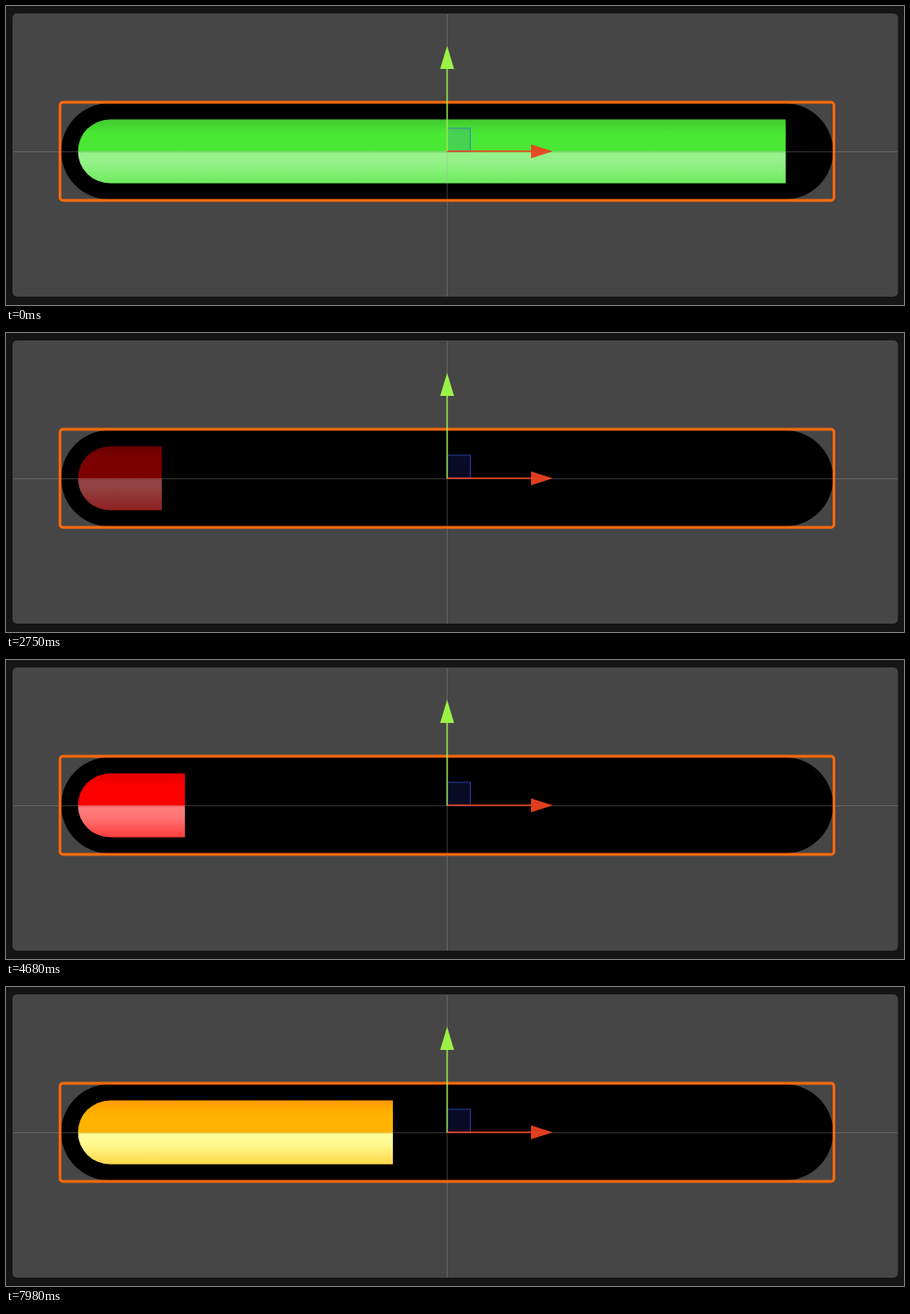
Recreate the animation shown at these times as an HTML page with a canvas. Size 968x323 px, loop 8 s.

```html
<!DOCTYPE html>
<html lang="en">
<head>
<meta charset="utf-8">
<title>Health bar</title>
<style>
  html, body { margin: 0; width: 100%; height: 100%; overflow: hidden; background: #151515; }
  canvas { display: block; }
</style>
</head>
<body>
<canvas id="stage" width="968" height="323"></canvas>
<script>
const ctx = document.getElementById('stage').getContext('2d');
const LOOP = 8000;
const STEP = 24.91;
const FULL_EDGE = 840.5;
const BLINK_LEVEL = 15;
const BLINK_PERIOD = 1507;
const WHITE = [255, 255, 255];

// Each drag moves the level one whole step at a time, evenly from start to end
const drags = [
  { start: 30, end: 60, from: 0, to: 2 },
  { start: 210, end: 630, from: 2, to: 10 },
  { start: 850, end: 1370, from: 10, to: 18 },
  { start: 1550, end: 2057, from: 18, to: 26, live: true },
  { start: 2057, end: 3620, from: 26, to: 28, live: true },
  { start: 3620, end: 4760, from: 28, to: 25, live: true },
  { start: 4880, end: 5360, from: 25, to: 21, live: true },
  { start: 5610, end: 5610, from: 21, to: 20 },
  { start: 6850, end: 6910, from: 20, to: 17 },
  { start: 7840, end: LOOP, from: 17, to: 17, live: true }
];

const clamp = (v, lo, hi) => Math.min(hi, Math.max(lo, v));
const mix = (a, b, k) => a.map((v, i) => v + (b[i] - v) * k);

// Level and the time of the last repaint; the view rests between drags
function stateAt(t) {
  const drag = drags.findLast(d => d.start <= t);
  if (!drag) return { level: 0, painted: 0 };
  const { start, end, from, to, live } = drag;
  const count = Math.abs(to - from);
  const gap = (end - start) / Math.max(1, count - 1);
  const taken = gap ? Math.min(count, 1 + Math.floor((t - start) / gap + 0.05)) : count;
  return {
    level: from + Math.sign(to - from) * taken,
    painted: live ? Math.min(t, end) : start + gap * Math.max(0, taken - 1)
  };
}

function flashAt({ level, painted }) {
  if (level < BLINK_LEVEL) return 1;
  return 1 + 0.4 * Math.cos((painted - 7980) / BLINK_PERIOD * 2 * Math.PI);
}

function hueAt(level) {
  const keys = [[2, 113], [17, 33], [23, 8], [26, 0]];
  const i = clamp(keys.findIndex(k => k[0] >= level), 1, 3);
  const [a, b] = level > 26 ? [keys[2], keys[3]] : [keys[i - 1], keys[i]];
  return mix(a, b, clamp((level - a[0]) / (b[0] - a[0]), 0, 1))[1];
}

function hsv(hue, sat, value) {
  return [5, 3, 1].map(n => {
    const k = (n + hue / 60) % 6;
    return value * (1 - sat * clamp(Math.min(k, 4 - k), 0, 1));
  });
}

function fillGradient(level, flash) {
  const hue = hueAt(level);
  const sat = clamp(0.77 + level * 0.0135, 0, 1);
  const dim = clamp((level - 26) * 25, 0, 50);
  const base = hsv(hue, sat, 231);
  const body = hsv(hue, sat, 231 - dim);
  const g = ctx.createLinearGradient(0, 122, 0, 192);
  const stop = (at, color) =>
    g.addColorStop(at, `rgb(${color.map(v => Math.min(255, Math.round(v * flash)))})`);
  stop(0, body.map(v => v * 0.86));
  stop(0.22, body);
  stop(0.49, body);
  stop(0.53, mix(base, WHITE, 0.43));
  stop(0.68, mix(base, WHITE, 0.4));
  stop(1, mix(base, WHITE, 0.2));
  return g;
}

function roundRect(x, y, w, h, r) {
  ctx.beginPath();
  ctx.roundRect(x, y, w, h, r);
}

function rect(color, x, y, w, h) {
  ctx.fillStyle = color;
  ctx.fillRect(x, y, w, h);
}

function triangle(color, x1, y1, x2, y2, x3, y3) {
  ctx.fillStyle = color;
  ctx.beginPath();
  ctx.moveTo(x1, y1);
  ctx.lineTo(x2, y2);
  ctx.lineTo(x3, y3);
  ctx.fill();
}

function drawPanel() {
  rect('#151515', 0, 0, 968, 323);
  ctx.fillStyle = '#464646';
  roundRect(7, 8, 954.5, 306, 5);
  ctx.fill();
  ctx.fillStyle = '#000';
  roundRect(59.5, 105, 832, 104, 52);
  ctx.fill();
}

function drawFill(state) {
  ctx.save();
  roundRect(77.6, 122.5, 797, 69, 34.5);
  ctx.clip();
  rect(fillGradient(state.level, flashAt(state)), 77, 122, FULL_EDGE - STEP * state.level - 77, 70);
  ctx.restore();
}

function drawGizmo() {
  const grid = 'rgba(165,165,165,0.3)';
  rect(grid, 475, 9, 1, 305);
  rect(grid, 8, 157, 953, 1);

  ctx.strokeStyle = '#ff6a0c';
  ctx.lineWidth = 2.8;
  roundRect(58.2, 104, 834.3, 106, 3);
  ctx.stroke();

  rect('rgba(50,80,255,0.14)', 476, 132, 25, 25);
  ctx.strokeStyle = 'rgba(55,95,245,0.6)';
  ctx.lineWidth = 1;
  ctx.strokeRect(475.5, 132, 25, 25);

  rect('rgba(235,66,32,0.85)', 475, 156, 92, 1.8);
  triangle('rgba(235,66,32,0.95)', 566, 149.5, 589.5, 157, 566, 164.5);
  rect('rgba(160,240,76,0.9)', 474.7, 67, 1.6, 90);
  triangle('#9cf146', 468, 68, 475.5, 43, 483, 68);
}

const start = performance.now();

function frame() {
  const t = (performance.now() - start) % LOOP;
  drawPanel();
  drawFill(stateAt(t));
  drawGizmo();
  requestAnimationFrame(frame);
}
frame();
</script>
</body>
</html>
```
